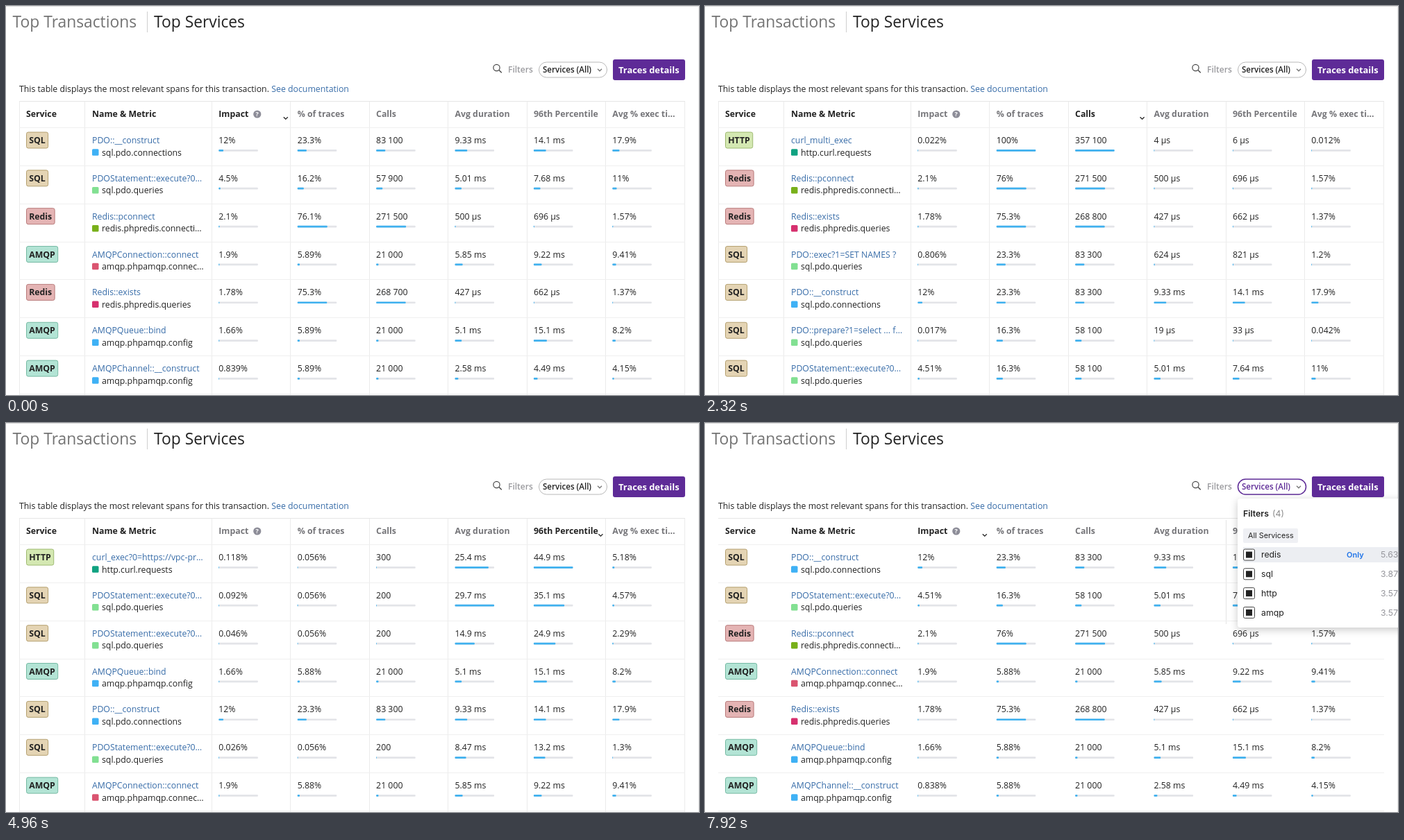
Animation, 998 px wide and 561 px high, one loop 8000 ms. Source, as an HTML page with a canvas:

```html
<!DOCTYPE html>
<html lang="en">
<head>
<meta charset="utf-8">
<title>Top Services</title>
<style>
html, body { margin: 0; width: 100%; height: 100%; overflow: hidden; background: #fff; }
canvas { display: block; }
</style>
</head>
<body>
<canvas id="stage" width="998" height="561"></canvas>
<script>
const g = document.getElementById('stage').getContext('2d');
const LOOP = 8000, PITCH = 54.85, COL = 113.4;
const SANS = '"Open Sans", "Noto Sans", sans-serif', UI = 'Inter, "Liberation Sans", sans-serif';
const BODY = '12.3px ' + SANS, BOLD = '700 ' + BODY;
const INK = '#222', GRAY = '#76767a', LINK = '#376ca8', BLUE = '#3fb1ef', PURPLE = '#5e2b97';

const badges = {
  SQL: ['#e4d4b4', '#b5a070'],
  Redis: ['#e4b4b4', '#b97c7c'],
  AMQP: ['#b3e4d5', '#74b9a2'],
  HTTP: ['#d4e8b2', '#9db96f'],
};
const metrics = {
  conn: ['sql.pdo.connections', '#3fb1f5'],
  query: ['sql.pdo.queries', '#82e092'],
  rconn: ['redis.phpredis.connecti…', '#78b01a'],
  rquery: ['redis.phpredis.queries', '#d6306e'],
  aconn: ['amqp.phpamqp.connec…', '#da5470'],
  config: ['amqp.phpamqp.config', '#3fb1f5'],
  curl: ['http.curl.requests', '#10a281'],
};
// service, name, metric, six cell values
const spans = {
  pdo: ['SQL', 'PDO::__construct', 'conn', '12%|23.3%|83 300|9.33 ms|14.1 ms|17.9%'],
  exec: ['SQL', 'PDOStatement::execute?0…', 'query', '4.51%|16.3%|58 100|5.01 ms|7.64 ms|11%'],
  pcon: ['Redis', 'Redis::pconnect', 'rconn', '2.1%|76%|271 500|500 µs|696 µs|1.57%'],
  amqp: ['AMQP', 'AMQPConnection::connect', 'aconn', '1.9%|5.88%|21 000|5.85 ms|9.22 ms|9.41%'],
  exists: ['Redis', 'Redis::exists', 'rquery', '1.78%|75.3%|268 800|427 µs|662 µs|1.37%'],
  bind: ['AMQP', 'AMQPQueue::bind', 'config', '1.66%|5.88%|21 000|5.1 ms|15.1 ms|8.2%'],
  chan: ['AMQP', 'AMQPChannel::__construct', 'config', '0.838%|5.88%|21 000|2.58 ms|4.49 ms|4.15%'],
  multi: ['HTTP', 'curl_multi_exec', 'curl', '0.022%|100%|357 100|4 µs|6 µs|0.012%'],
  names: ['SQL', 'PDO::exec?1=SET NAMES ?', 'query', '0.806%|23.3%|83 300|624 µs|821 µs|1.2%'],
  prep: ['SQL', 'PDO::prepare?1=select ... f…', 'query', '0.017%|16.3%|58 100|19 µs|33 µs|0.042%'],
  slowA: ['SQL', 'PDOStatement::execute?0…', 'query', '0.092%|0.056%|200|29.7 ms|35.1 ms|4.57%'],
  vpc: ['HTTP', 'curl_exec?0=https://vpc-pr…', 'curl', '0.118%|0.056%|300|25.4 ms|44.9 ms|5.18%'],
  slowB: ['SQL', 'PDOStatement::execute?0…', 'query', '0.046%|0.056%|200|14.9 ms|24.9 ms|2.29%'],
  slowC: ['SQL', 'PDOStatement::execute?0…', 'query', '0.026%|0.056%|200|8.47 ms|13.2 ms|1.3%'],
};
// values before the first refresh
const early = {
  pdo: '12%|23.3%|83 100|9.33 ms|14.1 ms|17.9%',
  exec: '4.5%|16.2%|57 900|5.01 ms|7.68 ms|11%',
  pcon: '2.1%|76.1%|271 500|500 µs|696 µs|1.57%',
  amqp: '1.9%|5.89%|21 000|5.85 ms|9.22 ms|9.41%',
  exists: '1.78%|75.3%|268 700|427 µs|662 µs|1.37%',
  bind: '1.66%|5.89%|21 000|5.1 ms|15.1 ms|8.2%',
  chan: '0.839%|5.89%|21 000|2.58 ms|4.49 ms|4.15%',
};
const byImpact = 'pdo exec pcon amqp exists bind chan';
const orders = [
  [0, byImpact],
  [1600, 'multi pcon exists names pdo prep exec'],
  [3440, 'slowA vpc slowB pdo slowC amqp bind'],
  [4560, 'vpc slowA slowB bind pdo slowC amqp'],
  [5440, 'pdo exec amqp bind vpc slowA chan'],
  [6400, byImpact],
];
const sorts = [[0, 0], [1280, 1], [2160, 2], [3200, 3], [4240, 4], [5200, 5], [6160, 0]];
const heads = ['Impact', '% of traces', 'Calls', 'Avg duration', '96th Percentile', 'Avg % exec ti…'];
const HOVER = 6640, OPEN = 7280, POINT = 7600, FADE = 7840;

const at = (list, t) => list.filter(e => e[0] <= t).pop()[1];

function text(s, x, y, color = INK, font = BODY) {
  g.font = font;
  g.fillStyle = color;
  g.fillText(s, x, y);
}
function rect(x, y, w, h, color) {
  g.fillStyle = color;
  g.fillRect(x, y, w, h);
}
function box(x, y, w, h, r, fill, stroke, line = 1) {
  g.beginPath();
  g.roundRect(x, y, w, h, r);
  if (fill) { g.fillStyle = fill; g.fill(); }
  if (stroke) { g.strokeStyle = stroke; g.lineWidth = line; g.stroke(); }
}
function path(points, color, line) {
  g.beginPath();
  points.forEach(([x, y]) => g.lineTo(x, y));
  g.strokeStyle = color;
  g.lineWidth = line;
  g.stroke();
}
const chevron = (x, y, r, color) => path([[x - r, y - r / 2], [x, y + r / 2], [x + r, y - r / 2]], color, 1.3);

// share of a bar that is filled
function share(value, col) {
  const n = parseFloat(value.replace(' ', ''));
  if (value.endsWith('%')) return n / 100;
  if (col === 2) return n / 357100;
  return n / (value.endsWith('µs') ? 1000 : 1) / (col === 3 ? 29.7 : 44.9);
}

function drawTop(t) {
  rect(0, 0, 998, 1, '#dcdcdc');
  rect(997, 0, 1, 561, '#ececec');
  const title = '500 22.8px ' + SANS;
  text('Top Transactions', 9.5, 31, '#737373', title);
  text('Top Services', 213, 31, INK, title);
  rect(203, 8, 1, 30, '#cfcfcf');

  g.beginPath();
  g.arc(706.5, 89, 4.6, 0, 7);
  g.strokeStyle = '#444';
  g.lineWidth = 1.2;
  g.stroke();
  path([[710, 92.5], [713.8, 96.3]], '#444', 1.3);
  text('Filters', 723, 96.4, '#9a9a9e', '600 12px ' + SANS);
  const hover = t >= HOVER, open = t >= OPEN;
  box(767.5, 81, 98, 22, 11, '#fff', open ? PURPLE : hover ? '#a98cc8' : '#b8b8b8', open ? 1.5 : 1);
  text('Services (All)', 773, 96, hover ? PURPLE : INK, '600 11.6px ' + SANS);
  chevron(855, 92.3, 3, '#777');
  box(874, 77, 104, 30, 3, PURPLE);
  text('Traces details', 882, 96.8, '#fff', '700 12.9px ' + SANS);

  text('This table displays the most relevant spans for this transaction.', 19, 124);
  text('See documentation', 382.3, 124, LINK);
}

function drawGrid(t) {
  const edges = [19, 113, 296, 409, 523, 636, 750, 863, 977];
  if (t < FADE) {
    for (const x of edges) rect(x, 137, 1, 424, '#ebebeb');
  } else {
    rect(750, 140, 1, 150, '#e4e4e4');
  }
  rect(19, 137, 959, 1, '#e6e6e6');
  for (let i = 0; i < 8; i++) rect(19, Math.round(175 + i * PITCH), 959, 1, '#efefef');
}

function drawHeads(sort) {
  text('Service', 29, 160.2, INK, BOLD);
  text('Name & Metric', 124, 160.2, INK, BOLD);
  heads.forEach((h, i) => text(h, 306.3 + i * COL, 160.2, i === sort ? INK : GRAY, BOLD));
  g.beginPath();
  g.arc(361.8, 156, 5.6, 0, 7);
  g.fillStyle = '#8d8d98';
  g.fill();
  text('?', 359.6, 159.3, '#fff', '700 9px ' + SANS);
  chevron(402.8 + sort * COL, 161.7, 3, INK);
}

function drawRow(id, y, fresh) {
  const [service, name, metric, values] = spans[id];
  const [fill, edge] = badges[service];
  g.font = BOLD;
  box(29.5, y - 16, g.measureText(service).width + 7.6, 23, 2.5, fill, edge);
  text(service, 33.2, y, INK, BOLD);
  text(name, 124, y, LINK);
  const [label, color] = metrics[metric];
  box(124, y + 8.2, 9.5, 9.5, 1.5, color);
  text(label, 138, y + 17.5);
  (fresh ? values : early[id]).split('|').forEach((v, i) => {
    const x = 306.3 + i * COL;
    text(v, x, y);
    box(x, y + 9, 56.6, 2.7, 1, '#e3e4e8');
    box(x, y + 9, Math.max(.7, 56.6 * share(v, i)), 2.7, 1, BLUE);
  });
}

function drawMenu(t) {
  g.save();
  g.shadowColor = 'rgba(0,0,0,.22)';
  g.shadowBlur = 12;
  g.shadowOffsetY = 3;
  box(767, 109, 245, 186, 4, '#fff');
  g.restore();
  box(874, 77, 104, 29, 3, PURPLE);
  text('Traces details', 882, 96.8, '#fff', '700 12.9px ' + SANS);
  const ui = '12.3px ' + UI;
  text('Filters', 775, 135.3, INK, '600 ' + ui);
  text('(4)', 817, 135.3, '#888', ui);
  box(775, 152, 79, 21, 2, '#eff0f4');
  text('All Servicess', 782, 166.4, INK, '10.8px ' + UI);
  const pointed = t >= POINT;
  if (pointed) rect(775, 179, 223, 22, '#eceef2');
  [['redis', '5.63'], ['sql', '3.87'], ['http', '3.57'], ['amqp', '3.57']].forEach(([name, count], i) => {
    const y = 190 + i * 27.8;
    box(775.5, y - 8, 16, 16, 2, '#fff', '#444');
    rect(779, y - 4.5, 9, 9, '#222');
    text(name, 801, y + 4.2, INK, ui);
    text(count, 973, y + 4.2, '#96969c', ui);
  });
  if (pointed) text('Only', 924, 194, '#1f74e8', '600 11px ' + UI);
}

function draw(now) {
  const t = now % LOOP;
  rect(0, 0, 998, 561, '#fff');
  drawTop(t);
  drawGrid(t);
  drawHeads(at(sorts, t));
  at(orders, t).split(' ').forEach((id, i) => drawRow(id, 198 + i * PITCH, t >= orders[1][0]));
  if (t >= OPEN) drawMenu(t);
  requestAnimationFrame(draw);
}
requestAnimationFrame(draw);
</script>
</body>
</html>
```
